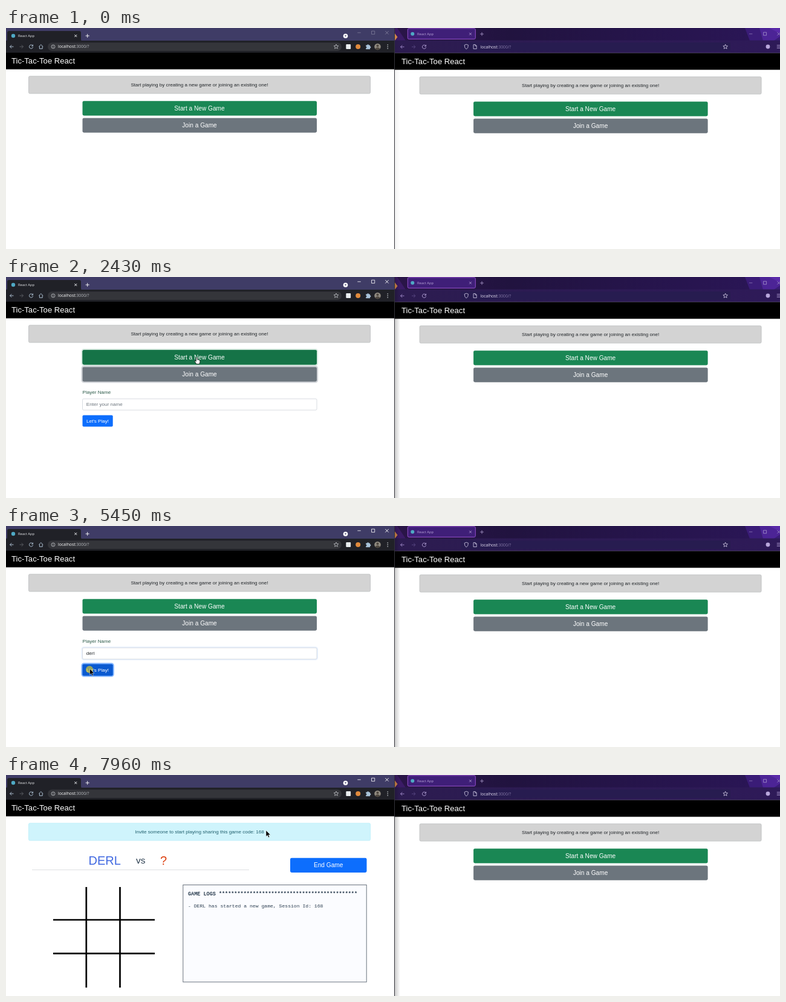
Write an HTML page that moves like this. It is 1280x367 px and loops after 8 s.

```html
<!DOCTYPE html>
<html lang="en">
<head>
<meta charset="utf-8">
<title>Tic-Tac-Toe React</title>
<style>
  html, body { margin: 0; width: 100%; height: 100%; overflow: hidden; background: #fff; }
  svg { display: block; width: 100vw; height: 100vh; }
  text { font-family: "Liberation Sans", Arial, sans-serif; white-space: pre; }
  .ui { font-family: "Open Sans", "Noto Sans", sans-serif; }
  .mono { font-family: "Liberation Mono", monospace; }
  .mid { text-anchor: middle; }
</style>
</head>
<body>
<svg id="stage" viewBox="0 0 1280 367" preserveAspectRatio="none"></svg>
<script>
const LOOP = 8000;
const NAME = 'derl';
const stage = document.getElementById('stage');

// ---- markup helpers ----
const rect = (x, y, w, h, fill, extra = '') =>
  `<rect x="${x}" y="${y}" width="${w}" height="${h}" fill="${fill}" ${extra}/>`;
const text = (x, y, size, fill, str, extra = '') =>
  `<text x="${x}" y="${y}" font-size="${size}" fill="${fill}" ${extra}>${str}</text>`;
const mid = (x, y, size, fill, str) => text(x, y, size, fill, str, 'class="mid"');
const line = (d, color, w = 0.9, extra = '') =>
  `<path d="${d}" fill="none" stroke="${color}" stroke-width="${w}" ${extra}/>`;
const dot = (x, y, r, fill, extra = '') => `<circle cx="${x}" cy="${y}" r="${r}" fill="${fill}" ${extra}/>`;
const group = (id, body, extra = '') => `<g id="${id}" ${extra}>${body}</g>`;
const cross = (x, y, r, color, w) =>
  line(`M${x - r},${y - r}l${2 * r},${2 * r}M${x + r},${y - r}l${-2 * r},${2 * r}`, color, w);
const plus = (x, y, r, color) => line(`M${x - r},${y}h${2 * r}M${x},${y - r}v${2 * r}`, color);
const arrow = (x, y, dir, color) =>
  line(`M${x - 3 * dir},${y}h${6 * dir}m${-2.8 * dir},-2.8l${2.8 * dir},2.8l${-2.8 * dir},2.8`, color);
const reload = (x, y, color) =>
  line(`M${x + 2.4},${y - 2}A3.1,3.1 0 1 0 ${x + 3.1},${y + 0.6}M${x + 3},${y - 3.4}v2.4h-2.4`, color);
const star = (x, y, color) => {
  let d = '';
  for (let i = 0; i < 10; i++) {
    const a = i * Math.PI / 5 - Math.PI / 2, r = i % 2 ? 1.8 : 4;
    d += `${i ? 'L' : 'M'}${(x + r * Math.cos(a)).toFixed(2)},${(y + r * Math.sin(a)).toFixed(2)}`;
  }
  return line(d + 'Z', color, 0.8);
};
const ring = (id, x, y, w, h, color) =>
  rect(x - 1, y - 1, w + 2, h + 2, 'none', `id="${id}" rx="3.4" stroke="${color}" stroke-width="2.2"`);
const windowKeys = (x, y, color) =>
  line(`M${x - 2.7},${y}h5.4M${x + 20.5},${y - 2.7}h5.2v5.2h-5.2z`, color, 0.8) +
  cross(x + 46, y, 2.7, color, 0.9);

// ---- page parts ----
const alertBox = (fill, edge, ink, str) =>
  rect(37.5, 80, 565, 28.8, fill, `rx="2" stroke="${edge}" stroke-width="0.8"`) + mid(320, 96.8, 8.1, ink, str);

const choices = p =>
  rect(126.5, 121.2, 387.5, 24.3, '#1a8754', 'rx="2.4"') +
  rect(126.5, 121.2, 387.5, 24.3, '#157347', `rx="2.4" opacity="0" id="${p}newHover"`) +
  rect(126.5, 149.4, 387.5, 24.3, '#6c757d', 'rx="2.4"') +
  rect(126.5, 149.4, 387.5, 24.3, '#5c636a', `rx="2.4" opacity="0" id="${p}joinHover"`) +
  mid(320, 136.9, 10.13, '#fff', 'Start a New Game') +
  mid(320, 165.1, 10.13, '#fff', 'Join a Game');

const lobby = p =>
  alertBox('#d3d3d3', '#bcbebf', '#212529', 'Start playing by creating a new game or joining an existing one!') + choices(p);

const form =
  text(126.5, 194.4, 8.1, '#2a5948', 'Player Name') +
  ring('inputRing', 126.5, 202.3, 387.5, 18.7, '#bcd7ff') +
  rect(126.5, 202.3, 387.5, 18.7, '#fff', 'id="field" rx="2" stroke="#ced4da" stroke-width="0.8"') +
  text(132.8, 214.4, 8.1, '#6c757d', 'Enter your name', 'id="hint"') +
  text(132.8, 214.4, 8.1, '#212529', NAME, 'id="typed"') +
  rect(133, 207, 0.8, 9, '#212529', 'id="caret"') +
  ring('playRing', 126.5, 229.4, 50.2, 19, '#86b7fe') +
  rect(126.5, 229.4, 50.2, 19, '#0d6efd', 'rx="2"') +
  rect(126.5, 229.4, 50.2, 19, '#0b5ad0', 'rx="2" id="playHover"') +
  text(133, 241.8, 8.1, '#fff', "Let's Play!");

const game =
  alertBox('#cff4fc', '#b9eef9', '#1f5f6d', 'Invite someone to start playing sharing this game code: 168') +
  text(136.5, 148.6, 20, '#4169e1', NAME.toUpperCase()) +
  text(215, 147.4, 15.5, '#2c3e50', 'vs') +
  text(255, 148.6, 20, '#dd4010', '?') +
  rect(43, 157, 359, 0.8, '#d6d8da') +
  rect(470, 137.8, 126.5, 24.2, '#0d6efd', 'rx="2.4"') +
  mid(533.2, 153.4, 10.13, '#fff', 'End Game') +
  line('M132.8,186v167M188.5,186v167M78,240.5h168M78,296.3h168', '#000', 2.7) +
  rect(292.8, 182.5, 303.4, 161.3, '#fbfcff', 'stroke="#59636f" stroke-width="0.9"') +
  text(301, 200, 8.49, '#2c3e50', 'GAME LOGS ' + '*'.repeat(45), 'class="mono" font-weight="700"') +
  text(301, 219.8, 8.1, '#2c3e50', `- ${NAME.toUpperCase()} has started a new game, Session Id: 168`, 'class="mono"');

const url = (x, y, size, ink, dim) =>
  `<text class="ui" x="${x}" y="${y}" font-size="${size}" fill="${ink}">localhost<tspan fill="${dim}">:3000/?</tspan></text>`;

const leftChrome =
  rect(0, 0, 642.5, 22, '#3f3c66') +
  '<path d="M0,21.5Q2,21.5 2,19V8Q2,5 5,5H121Q124,5 124,8V19Q124,21.5 126,21.5Z" fill="#202127"/>' +
  rect(0, 21, 642.5, 20.2, '#202127') +
  dot(12, 13, 3.2, '#4fa9c4') +
  text(20, 15.2, 5.8, '#e8eaed', 'React App', 'class="ui"') +
  cross(115.3, 13, 2, '#e8eaed', 1) + plus(134.7, 13, 3.1, '#fff') +
  dot(561.5, 13.2, 3.8, '#fff') + '<path d="M559.8,12.3h3.4l-1.7,2.2z" fill="#3f3c66"/>' +
  group('keysOff', windowKeys(584, 7.8, '#817e9b')) +
  group('keysOn', windowKeys(584, 7.8, '#fff')) +
  arrow(9.5, 31, -1, '#b9cfe2') + arrow(25.5, 31, 1, '#5f6368') + reload(41.5, 31, '#b9cfe2') +
  line('M54.3,31l3.5,-3.4l3.5,3.4M55.4,30.4v4h4.8v-4', '#b9cfe2') +
  rect(69, 24.2, 486, 13.8, '#34353a', 'rx="6.9"') +
  dot(78, 31, 3, 'none', 'stroke="#c4c7cb" stroke-width="0.8"') + line('M78,30.4v2.3M78,28.9v0.8', '#c4c7cb', 0.8) +
  url(86, 33.4, 6.83, '#fff', '#b6b9be') +
  star(546, 31, '#c4c7cb') +
  rect(562.3, 27, 7.8, 8, '#e9edef', 'rx="1"') +
  dot(582.2, 31, 4, '#e08a3c') +
  '<path d="M595.2,28.6h2a1.4,1.4 0 0 1 2.8,0h2v2a1.4,1.4 0 0 1 0,2.8v1.8h-6.8v-1.9a1.3,1.3 0 0 0 0,-2.6z" fill="#a9c3da"/>' +
  dot(614.5, 31, 5.3, '#8f8a80') + dot(614.5, 29.6, 2, '#4e473f') +
  '<path d="M610.7,34.7a3.9,3.3 0 0 1 7.6,0a5.3,5.3 0 0 1 -7.6,0z" fill="#4e473f"/>' +
  [28, 31, 34].map(y => dot(631.2, y, 0.8, '#dfe3e8')).join('') +
  rect(0, 41, 642.5, 27.6, '#000') +
  text(9, 59, 13.1, '#fff', 'Tic-Tac-Toe React');

const rightChrome =
  rect(643, 0, 637, 22, 'url(#bar)') +
  '<path d="M643,0h4l14,21h-18z" fill="#3b1b66"/><path d="M643,9l4.5,6l-4.5,6z" fill="#d98a4e"/>' +
  '<path d="M1222,0h58v21h-50z" fill="#3a1c77"/><path d="M1246,0h34v14l-10,7h-18z" fill="#4c2496"/><path d="M1262,0h18v9z" fill="#5a2ba9"/>' +
  rect(643, 20.5, 637, 21.2, 'url(#tool)') +
  rect(664.3, 0.8, 112, 17.6, '#3f1f78', 'rx="2" stroke="#9650cd" stroke-width="1"') +
  dot(672.3, 9.8, 3, '#4fa9c4') +
  text(680, 12, 5.8, '#b9a7d8', 'React App', 'class="ui"') +
  cross(768, 9.8, 1.9, '#b9a7d8', 0.8) + plus(787, 10, 2.9, '#a493c4') +
  line('M1229,9.8h5.4', '#8f7bb5', 0.8) + line('M1252.6,7.2h5v5h-5z', '#a998cf', 0.8) + cross(1278, 9.8, 2.6, '#a998cf', 0.8) +
  arrow(655.5, 31.3, -1, '#a58fce') + arrow(674, 31.3, 1, '#5c4a85') + reload(691.5, 31.3, '#b9a7dc') +
  rect(752, 24, 446, 14.2, '#271c50', 'rx="2"') +
  line('M761.3,27.2l3.2,1.2q0,5 -3.2,6.8q-3.2,-1.8 -3.2,-6.8z', '#d9d2ea', 0.8) +
  line('M773,27.6h3.2l2,2v5h-5.2zM776,27.6v2.2h2.2', '#d9d2ea', 0.8) +
  url(784.6, 33.8, 6.7, '#e6e0f3', '#8478a5') +
  star(1189.7, 31.2, '#d9d2ea') +
  dot(1260, 31, 3.4, '#b9a7dc') +
  line('M1274.8,28.6h5.2M1274.8,31h5.2M1274.8,33.4h5.2', '#b9a7dc', 0.8) +
  rect(643, 41.6, 637, 27.8, '#000') +
  text(654, 60, 13.1, '#fff', 'Tic-Tac-Toe React');

const pointers =
  group('arrowPtr', '<path d="M0,0V10.2L2.4,8 4,11.7 5.7,11 4.1,7.4H7.3Z" fill="#000" stroke="#fff" stroke-width="0.5"/>') +
  group('handPtr', '<path d="M-1,1Q0,-.7 1,1V4.3Q2,3.6 2.6,4.6Q3.6,4 4.2,5Q5.3,4.6 5.5,5.8V8Q5.3,9.5 4.6,10.5V11.5H-.8V10.5L-3.3,7Q-3.6,5.8 -2.4,6L-1,7.2Z" fill="#fff" stroke="#111" stroke-width="0.75"/>') +
  group('beamPtr', line('M-1.6,0h3.2M0,0v9M-1.6,9h3.2', '#222', 0.8));

stage.innerHTML =
  `<defs>
    <linearGradient id="bar"><stop stop-color="#2a1548"/><stop offset=".3" stop-color="#21133f"/><stop offset="1" stop-color="#2b1658"/></linearGradient>
    <linearGradient id="tool"><stop stop-color="#2c1c50"/><stop offset="1" stop-color="#2e1a58"/></linearGradient>
    <linearGradient id="edge"><stop stop-color="#000" stop-opacity=".2"/><stop offset="1" stop-color="#000" stop-opacity="0"/></linearGradient>
  </defs>` +
  rect(0, 0, 1280, 367, '#fff') + leftChrome +
  group('lobby', ring('newRing', 126.5, 121.2, 387.5, 24.3, '#8cc3a9') +
    ring('joinRing', 126.5, 149.4, 387.5, 24.3, '#b9bec3') + lobby('a') + group('form', form)) +
  group('game', game) +
  rightChrome + group('other', lobby('b'), 'transform="translate(646.6,1)"') +
  rect(643, 0, 9, 367, 'url(#edge)', 'id="shade"') +
  rect(642, 0, 1, 367, '#33333a') +
  dot(138, 238.3, 6, '#e8d21c', 'id="click" opacity=".62"') +
  group('pointer', pointers);

// ---- motion ----
const path = [
  [500, 0, 340], [640, 45, 235], [780, 94, 132], [850, 118, 108], [1050, 235, 93],
  [1190, 318, 91], [1265, 324, 104], [1330, 324, 118], [1400, 324, 127], [1880, 323.5, 128],
  [1950, 319, 131], [2087, 315, 133.5], [2160, 315.3, 133], [3959, 315.3, 133], [4030, 298, 142],
  [4170, 215, 186], [4295, 150, 226], [4360, 136.5, 233], [4515, 136.5, 234], [4720, 138, 236.3],
  [4850, 138.5, 237], [6119, 138.5, 237], [6120, 146, 225.6], [6449, 146, 225.6], [6520, 146.5, 227],
  [6779, 146.5, 227], [6780, 148, 226], [6920, 184, 206], [7125, 285, 164], [7330, 400, 127],
  [7540, 459, 111.5], [7612, 464, 110], [7750, 453, 101], [7955, 430, 92]
];
const starts = [500, 1880, 3960, 6120, 6780];
const STEP = 69.4;

function place(t) {
  const s = starts.filter(v => v <= t).pop();
  const q = s + Math.floor((t - s) / STEP + 1e-6) * STEP;
  const i = path.findIndex(p => p[0] > q);
  if (i < 0) return path[path.length - 1].slice(1);
  const [t0, x0, y0] = path[i - 1], [t1, x1, y1] = path[i];
  const k = (q - t0) / (t1 - t0);
  return [x0 + (x1 - x0) * k, y0 + (y1 - y0) * k];
}

const el = {};
stage.querySelectorAll('[id]').forEach(n => el[n.id] = n);
const show = (id, on) => el[id].setAttribute('visibility', on ? 'inherit' : 'hidden');
const fade = (id, v) => el[id].setAttribute('opacity', v);
const clamp = v => Math.max(0, Math.min(1, v));
// rises from a and falls from b, each over 140 ms in three steps
const pulse = (t, a, b = 1e9) => {
  const ramp = s => t < s ? 0 : clamp((Math.floor((t - s) / 70) + 1) / 3);
  return ramp(a) - ramp(b);
};
const within = (t, a, b) => t >= a && t < b;

function pointerKind(t, x, y) {
  if (t >= 5450) return t >= 6120 && x < 246 && y > 186 ? 'hand' : 'arrow';
  if (within(x, 126, 514) && (within(y, 121, 145.5) || within(y, 149.4, 174))) return 'hand';
  if (t > 1700 && x > 126 && within(y, 202, 221)) return 'beam';
  return t > 1700 && within(x, 126, 177) && y > 229 ? 'hand' : 'arrow';
}

function render(t) {
  const focused = t >= 1620;
  show('keysOff', !focused);
  show('keysOn', focused);
  fade('shade', focused ? 1 : 0.25);

  show('lobby', t < 5520);
  show('game', t >= 5520);
  show('form', within(t, 1700, 5520));
  fade('anewHover', pulse(t, 1390, 4030));
  fade('ajoinHover', pulse(t, 4030, 4170));
  fade('newRing', pulse(t, 1620, 2360));
  fade('joinRing', pulse(t, 2360, 2820));
  fade('inputRing', pulse(t, 2820, 5380));
  el.field.setAttribute('stroke', within(t, 2820, 5380) ? '#86b7fe' : '#ced4da');
  fade('playHover', t < 4430 ? 0 : pulse(t, 4430));
  fade('playRing', pulse(t, 5310));

  const typed = t >= 3560;
  show('hint', within(t, 1700, 3560));
  show('typed', within(t, 3560, 5520));
  show('caret', within(t, 2890, 3360) || within(t, 3560, 3960) || within(t, 4430, 4720) || within(t, 5180, 5380));
  el.caret.setAttribute('x', typed ? 147 : 133);

  const firstClick = within(t, 1550, 1700);
  show('click', firstClick || within(t, 5380, 5520));
  el.click.setAttribute('cx', firstClick ? 324 : 138);
  el.click.setAttribute('cy', firstClick ? 129 : 238.3);

  show('pointer', t >= 500);
  if (t < 500) return ['arrow', 'hand', 'beam'].forEach(k => show(k + 'Ptr', false));
  const [x, y] = place(t), kind = pointerKind(t, x, y);
  el.pointer.setAttribute('transform', `translate(${x.toFixed(2)},${y.toFixed(2)})`);
  for (const k of ['arrow', 'hand', 'beam']) show(k + 'Ptr', k === kind);
}

const begin = performance.now();
function tick() {
  render((performance.now() - begin) % LOOP);
  requestAnimationFrame(tick);
}
render(0);
requestAnimationFrame(tick);
</script>
</body>
</html>
```
